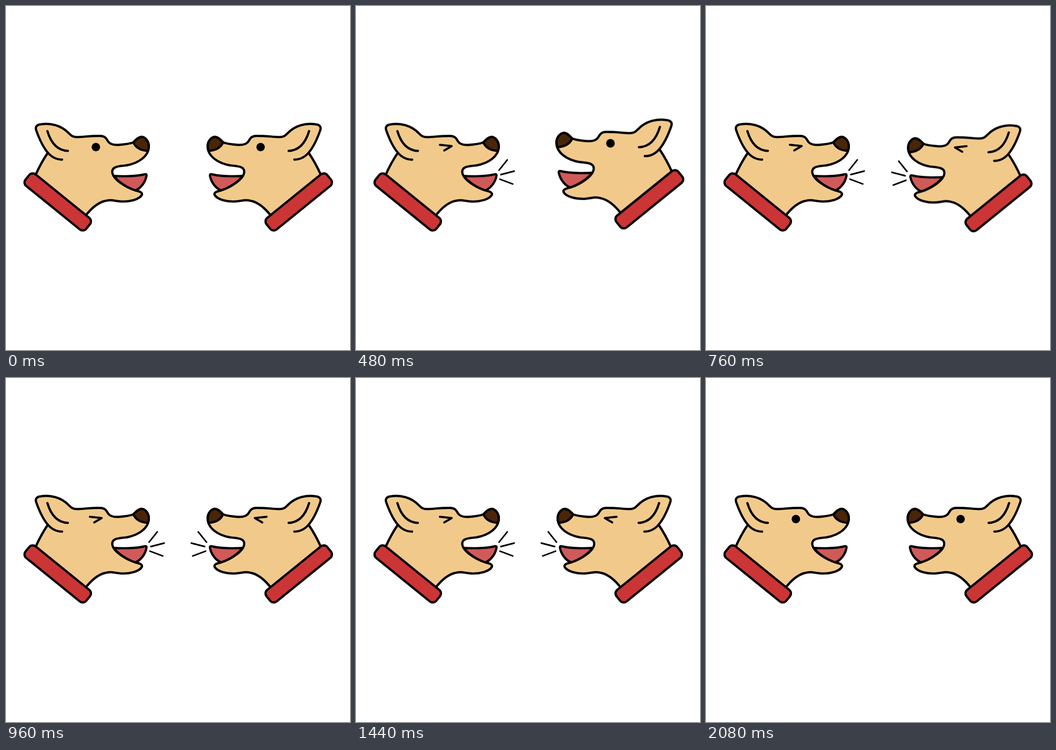
An HTML page without scripts that plays this animation: 748 by 748 pixels, repeating every 2.32 s.

```html
<!DOCTYPE html>
<html lang="en">
<head>
<meta charset="utf-8">
<title>Barking dogs</title>
<style>
html, body { margin: 0; width: 100%; height: 100%; overflow: hidden; background: #fff; }
svg { display: block; width: 100vw; height: 100vh; }
.line { fill: none; stroke: #000; stroke-width: 4.9; stroke-linecap: round; stroke-linejoin: round; }
.fur { fill: #f1ca8b; }
.nose { fill: #4a2508; }
.tongue { fill: #d05a5a; }
.collar { fill: #cb3535; }

.dog, .eye, .squint, .bark { animation: 2320ms linear infinite; }
.dog { transform-origin: 178px 722px; animation-name: bounce; }
.eye { transform-origin: 195.4px 306.7px; animation-name: blink-left; }
.squint { visibility: hidden; stroke-width: 4.6; animation-name: squint-left; }
.bark { stroke-width: 3.4; stroke-dasharray: 1 2; stroke-dashoffset: 1.1; animation-name: bark; }
.right .dog, .right .bark { animation-delay: 240ms; }
.right .eye { animation-name: blink-right; }
.right .squint { animation-name: squint-right; }

@keyframes bounce {
  0% { transform: scale(1); }
  1.724% { transform: scale(1.0023); }
  10.345% { transform: scale(1.0196); animation-timing-function: ease-out; }
  12.931% { transform: scale(1.0235); animation-timing-function: ease-in; }
  15.517% { transform: scale(1.0194); }
  20.69% { transform: scale(1); animation-timing-function: ease-out; }
  22.845% { transform: scale(.9925); animation-timing-function: ease-in-out; }
  28.448%, 100% { transform: scale(1); }
}
@keyframes bark {
  0%, 10.5% { stroke-dashoffset: 1.1; }
  10.501% { stroke-dashoffset: .98; }
  18.966%, 70.69% { stroke-dashoffset: 0; }
  79.1% { stroke-dashoffset: .98; }
  79.101%, 100% { stroke-dashoffset: 1.1; }
}
@keyframes blink-left {
  0%, 11.206% { transform: scaleY(1); }
  11.207%, 70.69% { transform: scaleY(0); }
  79.31%, 100% { transform: scaleY(1); }
}
@keyframes blink-right {
  0%, 21.551% { transform: scaleY(1); }
  21.552%, 70.69% { transform: scaleY(0); }
  79.31%, 100% { transform: scaleY(1); }
}
@keyframes squint-left {
  0%, 11.206% { visibility: hidden; }
  11.207%, 70.689% { visibility: visible; }
  70.69%, 100% { visibility: hidden; }
}
@keyframes squint-right {
  0%, 21.551% { visibility: hidden; }
  21.552%, 70.689% { visibility: visible; }
  70.69%, 100% { visibility: hidden; }
}
</style>
</head>
<body>
<svg viewBox="0 0 748 748">
  <defs>
    <g id="head" class="line">
      <path class="tongue" d="M234 369.500C252 370.700 282 370.500 299 366.500Q306 364 305.500 369C303 384 292 397 281 401C262 394 247 385 234 369.500Z"/>
      <path class="fur" d="M64 368Q76 341 91 319C79 305 72 288 66 271Q62 261 72 257.800C95 253 120 259 137 277C143 283 146 285 156 285C174 284 190 282 205 282.500C214 283 217 286 221 293C225 300 232 302.500 245 302C258 301 268 300 277 296.500C284 289 289 284.500 295 284.500C303 285 311 295 310.500 306C310 327 288 342 262 346.500C245 348 231 349 231 360C231 377 262 395 281 401C290 403 297 405 295.500 410.500C290 421 268 426 250 425C235 424 229 420 215 424C198 428 184 442 173 456L120 440Z"/>
      <path class="nose" d="M277 296.500C284 289 289 284.500 295 284.500C303 285 311 295 310.500 306Q310.500 310 308.500 315C293 314 282 308 277 296.500Z"/>
      <path d="M91 319Q104 334 122 334M90 272C96 292 108 314 134.500 315"/>
      <rect class="collar" x="-85" y="-16.200" width="170" height="32.400" rx="10" transform="translate(112.500 426) rotate(39)"/>
    </g>
    <circle id="eye" cx="195.400" cy="306.700" r="9.200"/>
    <path id="squint" d="M182.500 301.700L208 304.500L192 314"/>
    <g id="bark">
      <path pathLength="1" d="M311 357L329 334.500"/>
      <path pathLength="1" d="M315 366.500L344 359"/>
      <path pathLength="1" d="M313 376.500L341 387"/>
    </g>
  </defs>

  <g class="left">
    <g class="dog">
      <use href="#head"/>
      <use href="#eye" class="eye"/>
      <use href="#squint" class="line squint"/>
      <use href="#bark" class="line bark"/>
    </g>
  </g>
  <g class="right" transform="translate(749) scale(-1 1)">
    <g class="dog">
      <use href="#head"/>
      <use href="#eye" class="eye"/>
      <use href="#squint" class="line squint"/>
      <use href="#bark" class="line bark" x="2"/>
    </g>
  </g>
</svg>
</body>
</html>
```
